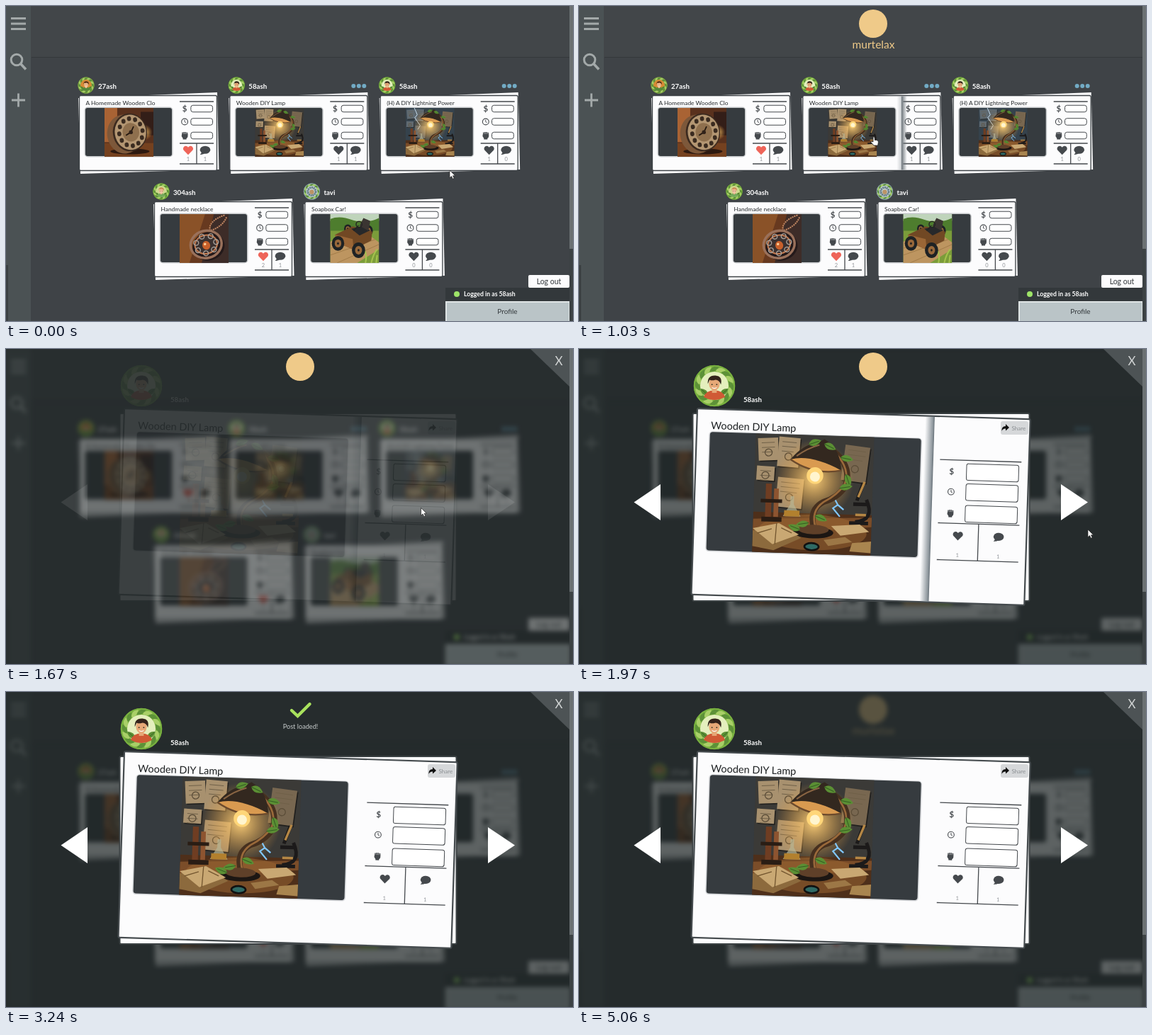
Recreate the animation shown at these times as an HTML page. Size 800 by 445 pixels, loop 5090 ms.

```html
<!DOCTYPE html>
<html lang="en">
<head>
<meta charset="utf-8">
<title>Craft board</title>
<style>
html, body { margin: 0; width: 100%; height: 100%; overflow: hidden; background: #3f4347; }
svg { display: block; width: 100%; height: 100%; font-family: Lato, "Open Sans", sans-serif; }
</style>
</head>
<body>
<svg id="stage" viewBox="0 0 800 445"></svg>
<script>
const INK = '#45494d', TAN = '#efca89', LOOP = 5090;

const rect = (x, y, w, h, fill, more = '') =>
  `<rect x="${x}" y="${y}" width="${w}" height="${h}" fill="${fill}" ${more}/>`;
const circle = (x, y, r, fill, more = '') =>
  `<circle cx="${x}" cy="${y}" r="${r}" fill="${fill}" ${more}/>`;
const oval = (x, y, rx, ry, fill, more = '') =>
  `<ellipse cx="${x}" cy="${y}" rx="${rx}" ry="${ry}" fill="${fill}" ${more}/>`;
const shape = (d, fill, more = '') => `<path d="${d}" fill="${fill}" ${more}/>`;
const line = (d, color, width = 1, more = '') =>
  `<path d="${d}" fill="none" stroke="${color}" stroke-width="${width}" ${more}/>`;
const text = (x, y, size, fill, s, more = '') =>
  `<text x="${x}" y="${y}" font-size="${size}" fill="${fill}" ${more}>${s}</text>`;
const at = (x, y, body, more = '') => `<g transform="translate(${x} ${y}) ${more}">${body}</g>`;
const group = (id, body, more = '') => `<g id="${id}" ${more}>${body}</g>`;
const ring = (n, f) => Array.from({ length: n }, (_, i) => f(i * 2 * Math.PI / n, i)).join('');
const MID = 'text-anchor="middle"', BOLD = 'font-weight="700"';

// Pictures are drawn on a 100 x 100 square.
const leaf = (x, y, a, s = 1) =>
  at(x, y, shape('M0 0Q4-6 11 0Q4 5 0 0', '#5b8f34') + line('M0 0H9', '#345c22', .6), `rotate(${a}) scale(${s})`);

function lamp(storm) {
  const wall = storm ? '#35424c' : '#3b3a37', paper = storm ? '#5f6a72' : '#a8916f';
  return rect(0, 0, 100, 100, wall) +
    [[2, 4, 17, 19, -4], [20, 2, 18, 25, 3], [76, 7, 21, 30, 6], [20, 36, 22, 25, 4], [2, 27, 15, 12, 2]]
      .map(([x, y, w, h, a], i) => at(x, y,
        rect(1, 1, w, h, '#201f1d') + rect(0, 0, w, h, i == 2 ? '#786750' : paper) +
        line(`M3 4h${w - 6}m0 4h${6 - w}m0 4h${w - 8}`, '#6f6048', .6) +
        circle(w / 2, h * .65, 3, 'none', 'stroke="#5c4e39" stroke-width=".8"'), `rotate(${a})`)).join('') +
    (storm ? line('M18 0L24 14L19 20L30 36L25 44', '#d4ecff', 1.3) : '') +
    rect(0, 66, 100, 34, '#4e2f1a') + shape('M0 72L100 68V76L0 86Z', '#7b4d29') +
    oval(50, 82, 46, 15, '#9a6432', 'opacity=".55"') +
    circle(50, 38, 34, 'url(#glow)') +
    rect(10, 42, 5, 28, '#6f3d22') + rect(17, 46, 4, 24, '#8d5430') + rect(6, 55, 18, 3, '#2a1d14') +
    rect(7, 70, 17, 4, '#2a1d14') +
    shape('M31 52h3v7l6 10h-15l6-10z', '#b7b694', 'opacity=".7"') + rect(26, 64, 13, 5, '#b2802e') +
    line('M67 51L71 58L67 61L73 68M71 58L76 62', '#82c8ff', 1.3) +
    line('M92 39L87 54M84 57h13M86 72Q103 70 95 53M81 73h16', '#1c1a1a', 3) +
    line('M93 38L88 51M86 66h9', '#b58745', 2) +
    line('M66 13Q82 25 77 42Q71 52 59 56Q46 63 52 80', '#46301f', 5) +
    line('M68 15Q81 28 76 41Q70 50 59 56Q48 64 53 78', '#99693a', 1.6) +
    oval(51, 82, 17, 5, '#1c1613') + oval(51, 79.5, 13, 4, '#5f4029') +
    shape('M30 21Q40 8 53 6L58 3L64 7Q72 15 73 29Q51 18 30 21Z', '#33281f') +
    shape('M30 21Q47 16 73 29Q50 34 30 21Z', '#d99a50') + line('M30 21Q50 34 73 29', '#6c4a2c', 1.4) +
    line('M35 18Q44 11 54 8', '#8a6543', 1.2) +
    circle(51, 34, 7, '#ffd679') + circle(51, 35, 4.2, '#fff5cf') +
    [[45, 8, -20], [58, 7, 25], [72, 18, 10], [77, 32, 70], [72, 44, -10],
     [52, 68, 20], [47, 74, 170], [40, 80, 200]].map(p => leaf(...p)).join('') +
    shape('M0 82L22 76L41 87L18 98L0 95Z', '#8c6a3d') + shape('M0 80L22 75L39 84L17 93Z', '#c9a873') +
    line('M20 75L19 93M24 79L33 83M4 84L16 80', '#73562f', .8) +
    shape('M66 76L90 74L98 80L74 84Z', '#c9a873') + shape('M60 88L78 85L84 89L64 93Z', '#9c7746') +
    shape('M84 90L100 88V98L82 97Z', '#a9854f') +
    oval(50, 94, 6, 3, '#2f6a64', 'stroke="#111" stroke-width="1.6"');
}

const clock = () => rect(0, 0, 100, 100, '#59311d') + rect(0, 0, 26, 70, '#a96334') +
  rect(74, 8, 26, 48, '#331e18') + circle(82, 50, 16, 'url(#glow)') +
  rect(0, 72, 100, 28, '#75411f') + oval(52, 89, 40, 6, '#2d1910') +
  at(52, 50, oval(-12, 2, 35, 40, '#7d583a') + oval(0, 0, 35, 39, '#3b2a1f') + oval(1, 0, 32, 36, '#b39672') +
    oval(2, 0, 17, 19, '#8f704e') +
    ring(12, a => oval(2 + 24 * Math.cos(a), 28 * Math.sin(a), 4.2, 4.8, '#3a2b20')) +
    line('M-9 5L2 0L9-11', '#23170f', 2.5) + circle(2, 0, 4, '#302219'), 'rotate(-8)');

const necklace = () => rect(0, 0, 100, 100, '#67391f') + shape('M0 0H52L20 100H0Z', '#8a5228') +
  shape('M70 0H100V100H45Z', '#3d2c28') +
  line('M92 2Q58 14 62 34Q88 26 96 6', '#c18762', 3, 'stroke-dasharray="3 1.5"') +
  at(54, 62, oval(4, 5, 33, 29, '#23191a') + oval(0, 0, 32, 28, 'none', 'stroke="#9a715b" stroke-width="5"') +
    oval(0, 0, 23, 19, '#3b3130', 'stroke="#c27a50" stroke-width="3"') +
    ring(7, a => circle(21 * Math.cos(a), 18 * Math.sin(a), 5, 'none', 'stroke="#a9a29c" stroke-width="2"')) +
    oval(0, 2, 8, 9, '#c8602b') + circle(-2, -1, 2.5, '#ffd09a'), 'rotate(-14)');

const wheel = (x, y, r) => oval(x, y, r * .85, r, '#1e2224') + oval(x, y, r * .45, r * .55, '#98683a') +
  oval(x, y, 2, 2.5, '#222');
const car = () => rect(0, 0, 100, 100, '#7b9c3a') + rect(0, 0, 100, 14, '#bfd4bb') +
  shape('M0 10Q20 2 45 12T100 8V34H0Z', '#4e7d2e') +
  shape('M0 56L70 36L100 58V72L55 100H0Z', '#bd9560') +
  line('M0 70L80 42M0 84L92 52M14 100L100 62', '#95703f', 1) +
  line('M72 100Q76 84 70 74M84 100Q88 82 96 72M94 100L96 84', '#a5c24d', 3) +
  wheel(78, 34, 11) + wheel(36, 30, 9) +
  shape('M10 42L46 25L86 36L84 54L48 73L14 58Z', '#714824') + shape('M10 42L46 51L48 73L14 58Z', '#9a6636') +
  shape('M43 30L64 25L82 33L60 44Z', '#27282a') + shape('M60 24L68 8L82 14L78 34Z', '#3b3532') +
  line('M48 34L58 23', '#222', 2) + circle(59, 21, 6, 'none', 'stroke="#222" stroke-width="2"') +
  wheel(16, 60, 15) + wheel(58, 74, 16);

// Avatars are drawn on a unit of radius 29.
function avatar(x, y, r, [rim, inner, skin, hair, shirt]) {
  const face = at(0, -1, shape('M-18 20Q-14 9 0 9Q14 9 18 20Q0 30-18 20Z', shirt) + rect(-4, 4, 8, 9, skin) +
    oval(0, -2, 9, 11, skin) + shape('M-11-2Q-12-17 2-16Q14-15 11-1Q8-9 2-9Q-5-7-8-9Z', hair) +
    circle(-4, -1, 1.1, '#332') + circle(4, -1, 1.1, '#332') + line('M-4 4Q0 7 4 4', '#fff', 1.3), 'scale(.84)');
  const gear = circle(0, 0, 14, 'none', `stroke="${hair}" stroke-width="7" stroke-dasharray="5 2"`) +
    circle(0, 2, 8, shirt);
  return at(x, y, circle(0, 0, 29, rim) +
    ring(16, (a, i) => at(24 * Math.cos(a), 24 * Math.sin(a),
      oval(0, 0, 7, 3, i % 2 ? '#a9cf68' : '#5d9138'), `rotate(${a * 57.3 + 60})`)) +
    circle(0, 0, 20, inner) +
    (skin ? leaf(-9, 13, 220, 1.3) + leaf(9, 13, -40, 1.3) + face : gear) +
    circle(0, 0, 28.3, 'none', `stroke="${rim}" stroke-width="2"`), `scale(${r / 29})`);
}
const FACES = {
  elf: ['#7fa444', '#d78a35', '#efbb8d', '#5c3218', '#54883a'],
  boy: ['#79b13f', '#e4efbd', '#e6a877', '#33231b', '#d05a35'],
  old: ['#78b13e', '#cfd990', '#ecb894', '#c98d55', '#75a95c'],
  gear: ['#8da5ad', '#c1cfd1', '', '#5d757f', '#bb9466']
};

const heart = (x, y, fill) =>
  shape('M0 6.5L-6.3 0C-9-3.6-4-9 0-4.2C4-9 9-3.6 6.3 0Z', fill, `transform="translate(${x} ${y})"`);
const bubble = (x, y) => at(x, y, oval(0, -.6, 7.3, 5.6, INK) + shape('M-5 2Q-5 5-7.3 6Q-3 6.5 0 4Z', INK));
const fist = (x, y) => at(x, y, shape('M-4-2H4.4V1Q4.4 3 2.5 4V5.5H-2.5V4L-4.4 1Z', INK) +
  line('M-3-4.5V-1M-.9-5V-1M1.3-5V-1M3.4-4.3V-1', INK, 1.6));
const dial = (x, y) => at(x, y, circle(0, 0, 4.4, 'none', `stroke="${INK}" stroke-width="1.1"`) +
  line('M0-2.7V0L1.8 1.4', INK, 1));

function panel(x, y, w, rows, fh, mid, end, likes, notes, hot) {
  const ix = w * .148, gap = end - mid;
  return at(x, y, line(`M0 0H${w}M0 ${mid}H${w}M0 ${end}H${w}M${w / 2} ${mid}V${end}`, INK, 1.3) +
    rows.map(r => rect(w * .33, r - fh / 2, w * .64, fh, '#fff', `rx="3" stroke="${INK}"`)).join('') +
    text(ix, rows[0] + 4, 11.5, INK, '$', MID + ' ' + BOLD) +
    dial(ix, rows[1]) + fist(ix, rows[2]) +
    heart(w * .25, mid + gap * .34, hot ? '#ee6459' : INK) + bubble(w * .75, mid + gap * .34) +
    text(w * .25, end - 4.5, 7.5, '#909498', likes, MID) + text(w * .75, end - 4.5, 7.5, '#909498', notes, MID));
}

const picture = (x, y, size, body) =>
  at(x, y, `<g clip-path="url(#square)">${body}</g>`, `scale(${size / 100})`);

function card(x, y, name, face, title, art, likes, notes, hot, own, extra = '') {
  return at(x, y, avatar(13, 12, 11.5, FACES[face]) + text(30, 17, 9.7, '#fff', name, BOLD) +
    (own ? [178, 185.5, 193].map(d => circle(d, 13, 3, '#72abc5')).join('') : '') +
    shape('M2 30L198 22L200.5 131L5 137Z', '#fcfcfd') +
    rect(3.5, 26.5, 194, 106, '#fcfcfd', 'rx="2" stroke="#3d4246" stroke-width="1.3"') +
    text(12.5, 40, 8.4, '#24282b', title) +
    rect(10.5, 42.5, 125, 71, '#a4a8ab', 'rx="5" opacity=".6"') + rect(12, 44, 122, 68, '#363b3f', 'rx="3"') +
    picture(39, 44, 69, art) +
    panel(145, 35, 48, [10, 28.5, 48], 9.5, 59, 88, likes, notes, hot) + extra);
}

const cards = () =>
  card(100, 100, '27ash', 'elf', 'A Homemade Wooden Clo', clock(), 1, 1, 1, 0) +
  card(312.3, 100, '58ash', 'boy', 'Wooden DIY Lamp', lamp(), 1, 1, 0, 1,
    group('lift', rect(142.5, 27.5, 8, 104, 'url(#right)') + rect(136, 27.5, 6.5, 104, 'url(#left)', 'opacity=".35"'))) +
  card(524.7, 100, '58ash', 'boy', '(H) A DIY Lightning Power', lamp(true), 1, 0, 0, 1) +
  card(206, 250, '304ash', 'old', 'Handmade necklace', necklace(), 2, 1, 1, 0) +
  card(418.4, 250, 'tavi', 'gear', 'Soapbox Car!', car(), 0, 0, 0, 0);

const page = () => rect(0, 0, 800, 72, '#424649') + line('M36 72.5H796', '#34383b') +
  rect(0, 0, 35, 445, '#4b5254') + rect(0, 366, 3, 79, '#3a4042') +
  line('M7 17.5H28M7 25H28M7 32.5H28', '#a3a9a9', 2.8) +
  circle(15, 76, 7.8, 'none', 'stroke="#a3a9a9" stroke-width="3"') + line('M20.5 81.5L28 89.5', '#a3a9a9', 3.6) +
  line('M8 133H27M17.5 123.5V142.5', '#a3a9a9', 2.8) +
  group('brand', circle(415, 25, 20, TAN) + text(415.5, 60, 15.5, TAN, 'murtelax', MID)) + cards() +
  rect(737, 380, 58, 18, '#fcfcfd', 'rx="2"') + text(766, 393, 10.5, '#33383b', 'Log out', MID) +
  rect(620, 398, 175, 19, '#33383b') + circle(636, 407, 4, '#9ee468') +
  text(646, 410.2, 8.7, '#fff', 'Logged in as 58ash', BOLD) +
  rect(621, 418, 174, 29, '#bac4c7', 'stroke="#dfe4e5" stroke-width="2"') +
  text(707.5, 435, 10, '#33383b', 'Profile', MID);

const post = () => avatar(191, 52, 29, FACES.boy) + text(232, 75, 9.7, '#fff', '58ash', BOLD) +
  rect(160.5, 91, 475, 265, '#fcfcfd', 'rx="2" stroke="#3b4143" stroke-width="2"') +
  at(168, 84, rect(-1, 0, 470, 263, '#fcfcfd', 'rx="2" stroke="#454b4e" stroke-width="2.2"') +
    text(19, 28.5, 14.5, '#1d2022', 'Wooden DIY Lamp') +
    rect(16.5, 31.5, 301, 170, '#aeb2b5', 'rx="5" opacity=".5"') +
    rect(18, 32.5, 298, 167.5, '#363b3f', 'rx="4"') + picture(82.5, 32.5, 167.5, lamp()) +
    panel(343.5, 61, 115, [16.5, 45, 75.5], 23.5, 89.5, 141.5, 1, 1) +
    group('fold', rect(321, 1, 12.5, 261, 'url(#left)') + line('M333.5 1V262', '#707980', 1.2)),
    'rotate(1.85)') +
  rect(595, 102, 39, 19, '#d6d8da', 'rx="3"') +
  shape('M596.5 116Q596 109 602 109V106L607 111L602 115.5V112.5Q598 112 596.5 116Z', '#111') +
  text(610.5, 115, 8, '#8a8e91', 'Share') +
  shape('M77.5 216.5L115 191V242ZM718 216.5L680 191V242Z', '#fff');

const fade = (id, c, end) => `<linearGradient id="${id}">` +
  `<stop offset="0" stop-color="${c}" stop-opacity="${1 - end}"/>` +
  `<stop offset="1" stop-color="${c}" stop-opacity="${end}"/></linearGradient>`;

const stage = document.getElementById('stage');
stage.innerHTML = `<defs><clipPath id="square">${rect(0, 0, 100, 100, '#000')}</clipPath>
  <radialGradient id="glow"><stop offset="0" stop-color="#ffd27a" stop-opacity=".95"/>
  <stop offset="1" stop-color="#e59a3c" stop-opacity="0"/></radialGradient>
  ${fade('left', '#7d878e', 1)}${fade('right', '#697177', 0)}</defs>` +
  group('page', page()) +
  group('overlay', rect(0, 0, 800, 445, '#1a2121', 'id="shade"') + shape('M740 0H796V54Z', '#4d5355') +
    text(780, 23, 17, '#d2d5d5', 'X', MID)) +
  rect(795, 0, 5, 445, '#3c4244') + rect(795, 0, 5, 343, '#6b7173') +
  group('loader', circle(415, 25, 20, TAN)) + group('post', post()) +
  group('toast', line('M403 26L411.5 34L428.5 17', '#a9e25d', 4.4,
    'id="tick" stroke-linecap="round" stroke-dasharray="38"') +
    text(415.5, 52, 9.2, '#c7cccc', 'Post loaded!', MID)) +
  group('cursor', shape('M0 0V10.8L2.5 8.5L4.3 12.3L6.2 11.4L4.5 7.8H7.8Z', '#fff',
    'id="arrow" stroke="#222" stroke-width=".7"') +
    shape('M0 0Q1.5-1 2 1L2.4 4.5Q7 4 7.3 7L6.6 12H1L-3 7.5Q-3 5.5 0 7Z', '#fff',
      'id="hand" stroke="#222" stroke-width=".7"'));

const $ = id => document.getElementById(id);
const show = (id, k) => { $(id).style.opacity = k; $(id).style.display = k > 0 ? '' : 'none'; };
const ramp = (t, a, b) => { const k = Math.min(1, Math.max(0, (t - a) / (b - a))); return k * k * (3 - 2 * k); };
const path = [[0, 626, 232], [500, 419, 187], [1060, 415, 185], [1400, 415, 185], [1900, 718, 255]];

function pointer(t) {
  let [, x, y] = path[0];
  for (let i = 1; i < path.length; i++) {
    const k = ramp(t, path[i - 1][0], path[i][0]);
    x += (path[i][1] - path[i - 1][1]) * k;
    y += (path[i][2] - path[i - 1][2]) * k;
  }
  return [x, y];
}

let blurred;
function draw(now) {
  const t = now % LOOP, open = t >= 1180, shown = ramp(t, 1650, 1760);
  if (open !== blurred) $('page').style.filter = (blurred = open) ? 'blur(3px)' : 'none';
  show('overlay', open ? 1 : 0);
  $('shade').style.opacity = .62 + .08 * shown;
  show('brand', open ? ramp(t, 3820, 4020) : ramp(t, 30, 250));
  show('lift', open ? 0 : ramp(t, 260, 420));
  show('loader', open ? 1 - ramp(t, 2200, 2260) : 0);
  show('post', shown);
  show('fold', 1 - ramp(t, 1980, 2200));
  show('toast', ramp(t, 2250, 2350) * (1 - ramp(t, 3500, 3800)));
  $('tick').style.strokeDashoffset = 38 * (1 - ramp(t, 2260, 2480));
  const [x, y] = pointer(t), hand = !open && x < 510;
  $('cursor').setAttribute('transform', `translate(${x} ${y})`);
  show('cursor', t < 2270 ? 1 : 0);
  show('hand', hand ? 1 : 0);
  show('arrow', hand ? 0 : 1);
  requestAnimationFrame(() => draw(performance.now() - start));
}
const start = performance.now();
draw(0);
</script>
</body>
</html>
```
